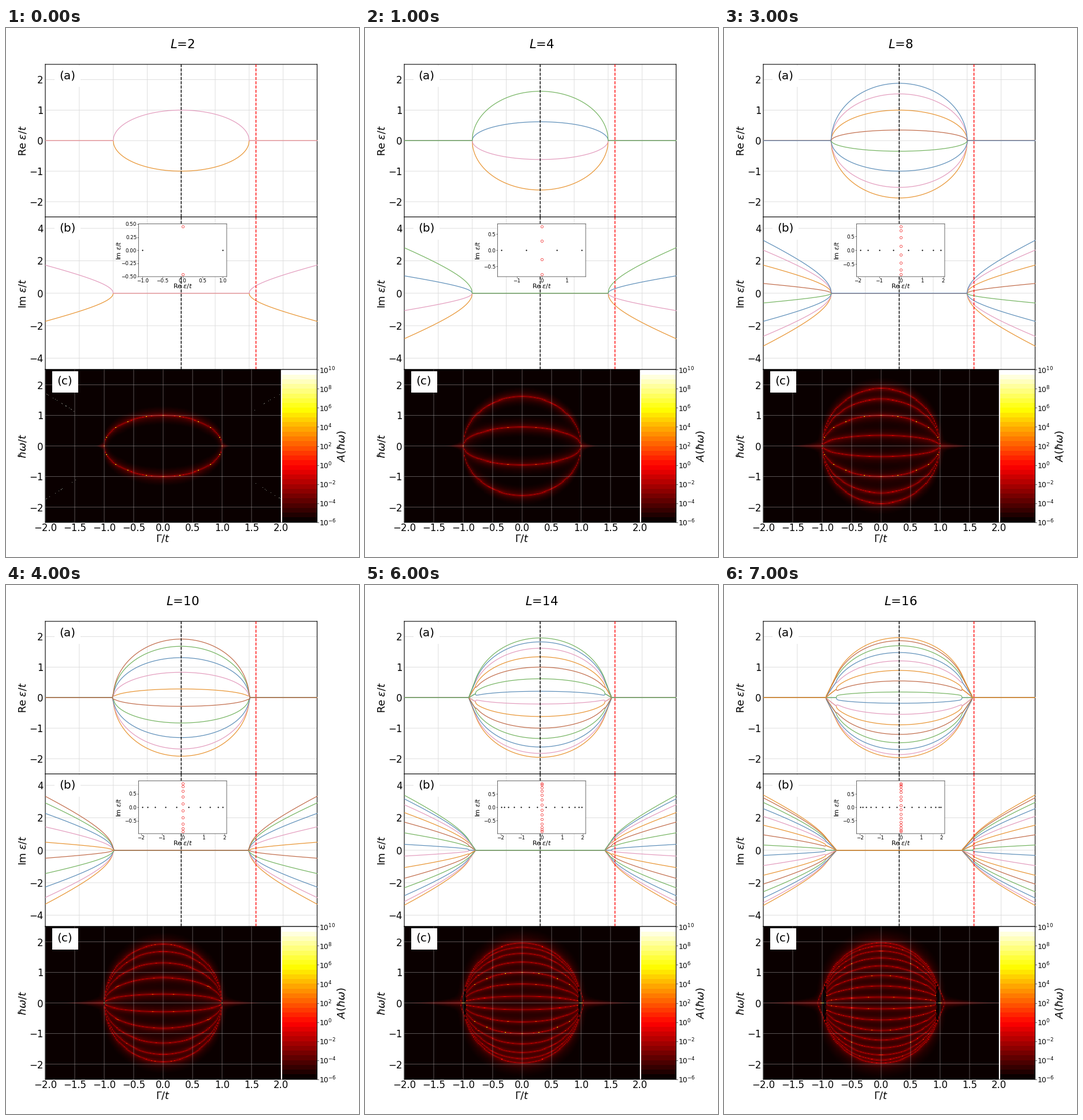
Animation, 611 px wide and 917 px high, one loop 8 s. Source, as a matplotlib script:

```python
import numpy as np
import matplotlib.pyplot as plt
from matplotlib.animation import FuncAnimation
from matplotlib.colors import LogNorm

W, H, DPI = 611, 917, 64
SIZES = range(2, 17, 2)
CORNER = 1e-11          # weak link closing the chain
ETA = 3e-7              # spectral broadening
GAMMA_RED = 1.1
COLORS = ["#e8932f", "#e39bbd", "#5b8db8", "#73b35f", "#c06a48"]


def px(v):
    """Pixels to points."""
    return v * 72 / DPI


def energies(size, gamma):
    """Eigenvalues of the nonreciprocal chain, one row per gamma."""
    gamma = np.atleast_1d(gamma)
    h = np.zeros((len(gamma), size, size))
    j = np.arange(size - 1)
    h[:, j, j + 1] = (1 + gamma)[:, None]
    h[:, j + 1, j] = (1 - gamma)[:, None]
    if size > 2:
        h[:, 0, -1] = h[:, -1, 0] = CORNER
    return np.linalg.eigvals(h).astype(complex)


def spectral(size):
    gamma = np.arange(-100, 101) / 50
    omega = np.arange(-125, 126) / 50
    z = omega[:, None] + 1j * ETA
    a = np.zeros((len(omega), len(gamma)))
    for e in energies(size, gamma).T:
        a -= (1 / (z - e)).imag / np.pi
    a = np.maximum(a, 0)

    # zero mode: bright near the exceptional points, a faint tail outside
    dist = np.abs(gamma) - 1
    tail = np.where(dist > 0, 5e-4 * np.exp(-80 * np.abs(dist) / size), 0)
    a += tail / (1 + (omega[:, None] / 0.015) ** 2)
    width = max((CORNER / 2) ** (2 / size), 0.005)
    a[125, np.abs(dist) <= width] = 2e5
    return np.clip(a, 1e-6, 1e10)


fig = plt.figure(figsize=(W / DPI, H / DPI), dpi=DPI, facecolor="white")


def panel(x0, y0, x1, y1, z=1):
    ax = fig.add_axes([x0 / W, 1 - y1 / H, (x1 - x0) / W, (y1 - y0) / H],
                      zorder=z)
    for s in ax.spines.values():
        s.set(linewidth=px(1.1), snap=False)
    return ax


ax_re = panel(68, 63, 538.5, 327.5)
ax_im = panel(68, 327.5, 538.5, 592)
ax_sp = panel(68, 592, 476, 857)
ax_cb = panel(478, 592, 538.5, 857)
ax_in = panel(229.5, 339.5, 382, 431, 3)
ax_sp.spines["right"].set_visible(False)
ax_cb.spines["left"].set_visible(False)
top = fig.add_axes([0, 0, 1, 1], zorder=5)
top.set(xlim=(0, W), ylim=(H, 0))
top.axis("off")


def label(x, y, s, size, **kw):
    kw = {"ha": "center", "va": "center", **kw}
    return top.text(x, y, s, fontsize=px(size), **kw)


def setup(ax, ylim, yticks, grid, alpha=1):
    ax.set(xlim=(-2, 2), ylim=(-ylim, ylim))
    ax.set_xticks(np.arange(-4, 5) / 2, [""] * 9)
    ax.set_yticks(yticks)
    ax.tick_params(length=0, pad=px(3.5), labelsize=px(16.5))
    ax.grid(color=grid, alpha=alpha, lw=px(0.9), snap=False)


setup(ax_re, 2.5, range(-2, 3), "#dcdcdc")
setup(ax_im, 4.7, range(-4, 5, 2), "#dcdcdc")
setup(ax_sp, 2.5, range(-2, 3), "#b8b8b8", 0.5)

for ax in (ax_re, ax_im):
    ax.set_axisbelow(True)
    for x, color in ((0, "black"), (GAMMA_RED, "red")):
        ax.axvline(x, color=color, ls="--", lw=px(1.4), zorder=4, snap=False)

image = ax_sp.imshow(np.ones((251, 201)), cmap="hot", origin="lower",
                     norm=LogNorm(1e-6, 1e10), aspect="auto",
                     interpolation="nearest", zorder=0,
                     extent=(-2.01, 2.01, -2.51, 2.51))
ax_sp.set(xlim=(-2, 2), ylim=(-2.5, 2.5))
ax_sp.set_axisbelow(False)

rng = np.random.default_rng(4)
spot = rng.uniform(1.45, 2, 44)
spot_x = spot * rng.choice([-1, 1], 44)
spot_y = np.sqrt(spot ** 2 - 1) * rng.choice([-1, 1], 44)
specks, = ax_sp.plot(spot_x, spot_y, ls="", marker="s", ms=px(0.9),
                     mew=0, color="#8a8a80")

ax_cb.imshow(np.linspace(0, 1, 400)[:, None], cmap=plt.get_cmap("hot", 32),
             origin="lower", aspect="auto", extent=(0, 1, -6, 10))
ax_cb.set_xticks([])
ax_cb.yaxis.tick_right()
powers = range(-6, 11, 2)
ax_cb.set_yticks(powers, [f"$10^{{{p}}}$" for p in powers])
ax_cb.tick_params(length=px(2), width=px(0.8), pad=px(1.5),
                  labelsize=px(12.3))

title = label(306, 35, "", 21.2, va="baseline")
label(29, 195, r"Re $\varepsilon/t$", 17.6, rotation=90)
label(29, 460, r"Im $\varepsilon/t$", 17.6, rotation=90)
label(29, 724.5, r"$\hbar\omega/t$", 18, rotation=90)
label(272, 886, r"$\Gamma/t$", 17.6)
label(581, 724.5, r"$A(\hbar\omega)$", 18, rotation=90)
label(195, 385, r"Im $\varepsilon/t$", 11, rotation=90)
label(306, 448, r"Re $\varepsilon/t$", 11)
for k in range(9):
    label(68 + 51 * k, 867.5, f"{k / 2 - 2:.1f}".replace("-", "\u2212"), 16.5)
for x, y, s in ((106.5, 83.5, "(a)"), (106.5, 348, "(b)"),
                (102.3, 613.3, "(c)")):
    top.add_patch(plt.Rectangle((x - 22.7, y - 18.5), 45.4, 37, fc="white",
                                ec="none"))
    label(x - 0.5, y - 0.8, s, 20)

lines_re, lines_im = (
    [ax.plot([], [], color=COLORS[k % 5], lw=px(1.2), zorder=3)[0]
     for k in range(SIZES[-1])]
    for ax in (ax_re, ax_im))

dots, = ax_in.plot([], [], "o", color="black", ms=px(2.2), mew=0)
rings, = ax_in.plot([], [], "o", mfc="none", mec="#f23a3a", ms=px(4.2),
                    mew=px(0.8))
for s in ax_in.spines.values():
    s.set(linewidth=px(0.8), edgecolor="#444444")
ax_in.tick_params(length=px(2), width=px(0.6), pad=px(1.2),
                  labelsize=px(8.7))


def inset_axis(axis, set_lim, peak, step, digits):
    lim = 1.1 * peak
    n = int(lim / step)
    ticks = step * np.arange(-n, n + 1)
    set_lim(-lim, lim)
    axis.set_ticks(ticks, [f"{v:.{digits}f}".replace("-", "\u2212")
                           for v in ticks])


GAMMA = np.arange(-300, 301) / 150


def update(i):
    size = SIZES[i]
    title.set_text(f"$L$={size}")
    e = energies(size, GAMMA)
    for lines, part in ((lines_re, e.real), (lines_im, e.imag)):
        part = np.sort(part, axis=1)
        for k, line in enumerate(lines):
            if k < size:
                line.set_data(GAMMA, part[:, k])
            else:
                line.set_data([], [])

    real = energies(size, 0.0)[0]
    imag = energies(size, GAMMA_RED)[0]
    dots.set_data(real.real, real.imag)
    rings.set_data(imag.real, imag.imag)
    small = size == 2
    inset_axis(ax_in.xaxis, ax_in.set_xlim, np.abs(real.real).max(),
               0.5 if small else 1, 1 if small else 0)
    inset_axis(ax_in.yaxis, ax_in.set_ylim, np.abs(imag.imag).max(),
               0.25 if small else 0.5, 2 if small else 1)

    image.set_data(spectral(size))
    specks.set_visible(small)
    return []


anim = FuncAnimation(fig, update, frames=len(SIZES), interval=1000,
                     repeat=True, repeat_delay=0, blit=False)
plt.show()
```
